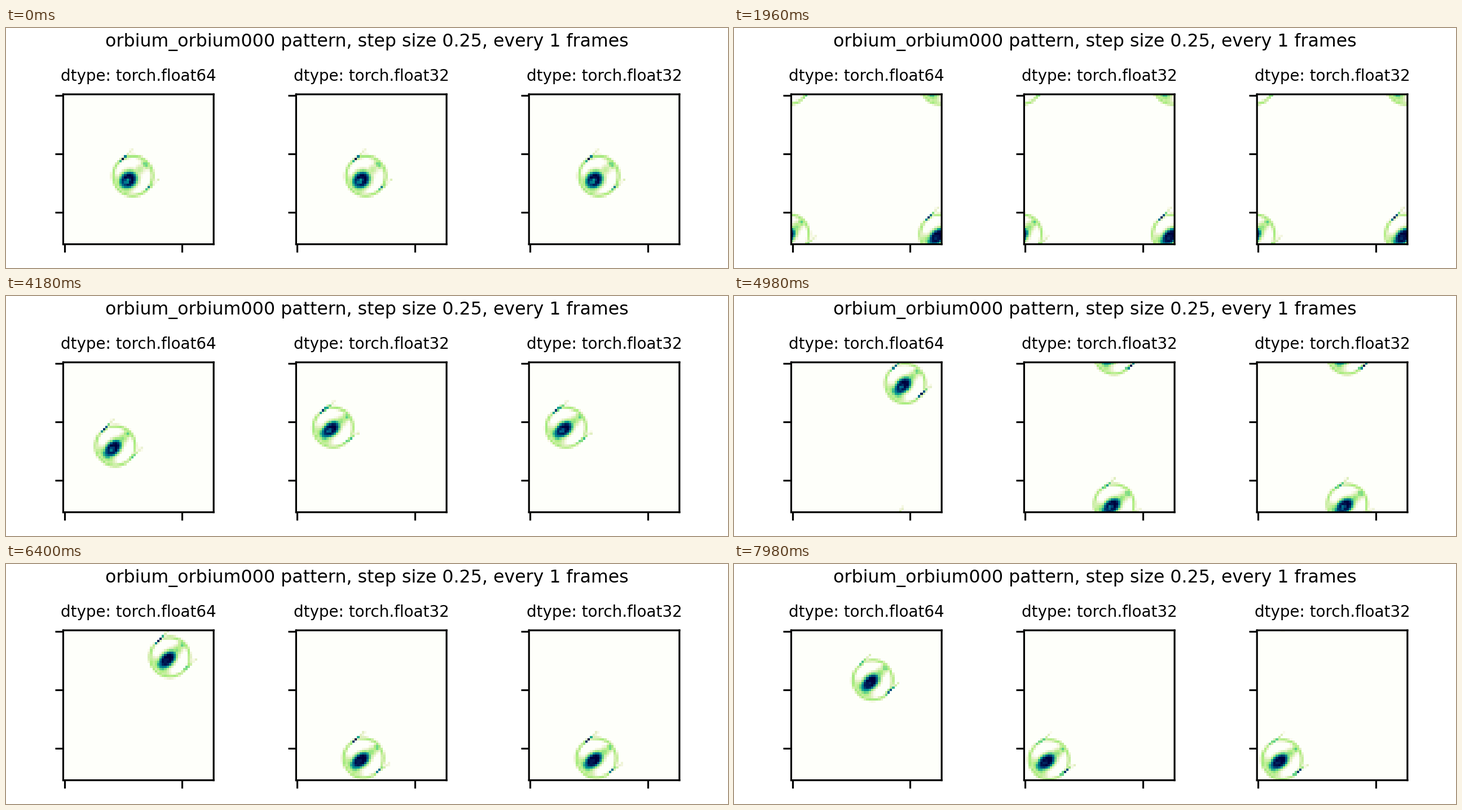
Recreate the animation shown at these times as a matplotlib script. Size 1280 by 427 pixels, loop 8000 ms.

```python
import numpy as np
import matplotlib.pyplot as plt
from matplotlib.animation import FuncAnimation
from matplotlib.colors import LinearSegmentedColormap

W, H, DPI = 1280, 427, 256
PT = 1.114                       # point scale: the layout is 4.5 inches wide
N, FRAMES = 64, 400
SIDE, TOP = 266.7, 118.0
LEFTS = (101.45, 514.35, 927.2)
DTYPES = ("float64", "float32", "float32")

CMAP = LinearSegmentedColormap.from_list("deep", [
    (0.00, "#fefffa"), (0.04, "#f9faea"), (0.10, "#e6f0c8"),
    (0.25, "#b0ee82"), (0.42, "#54cd8a"), (0.55, "#009691"),
    (0.70, "#00648c"), (0.85, "#002d66"), (1.00, "#00003c")])

# Unwrapped path of the glider in cells; single precision veers off midway.
PATH_T = (0, 54, 142, 399)
TURN_T = (0, 54, 130, 155)
PATHS = {
    "float64": ((29.7, -23.1, -106.4, -349.2), (34.8, 82.3, 165.0, 405.2),
                (42, 44.5, 44.7, 44.7)),
    "float32": ((29.7, -23.1, -106.6, -373.3), (34.8, 82.3, 165.0, 375.1),
                (42, 44.5, 44.0, 38.2)),
}

grid_y, grid_x = np.mgrid[0:N, 0:N] + 0.5


def bump(u, center, width):
    return np.exp(-((u - center) / width) ** 2)


def wrap(d):
    return (d + N / 2) % N - N / 2


def body(a, b, n):
    """Density at a (forward) and b (sideways) from the ring's centre."""
    r, side = np.hypot(a, b), np.abs(b)
    start = np.exp(-n / 4)

    ring = 0.27 * bump(r, 8.4, 0.7) * (1 - 0.9 * (1 - start) * bump(a, -1.5, 2.4))

    mid = 1.3 + 1.0 * start
    length = np.where(a > mid, 4.8, 4.3) - 0.5 * start
    rho = np.hypot((a - mid) / length, b / (2.75 + 0.6 * start))
    core = np.minimum(1.15 * np.exp(-rho ** 3), 1.02)
    dip = 0.28 + 0.14 * np.sin(1.9 * n) + 0.3 * start
    core -= dip * bump(a, mid + 1, 1.4) * bump(b, 0, 0.95)

    front = 0.62 * bump(a, 5.2, 2.0) * bump(b, 0, 3.0)
    cheeks = 0.31 * bump(a, 6.2, 2.0) * bump(b, 0, 5.2) * (r < 9)
    tail = 0.33 * (1 - 0.4 * start) * bump(a, -3.8, 3.0) * bump(b, 0, 1.8)
    spot = 0.42 * bump(a, -7.3, 1.4) * bump(b, 0, 1.5 + 0.6 * start)

    flicker = 0.85 + 0.2 * np.sin(2.1 * n + 1.3 * np.sign(b) + 1)
    streak = flicker * bump(a, -1.9, 2.7 - 0.8 * start) * bump(side, 8.25, 0.42)
    tip = 0.13 * bump(a, -6.6, 1.1) * bump(side, 8.5, 0.6)

    v = np.max([ring, core, front, cheeks, tail, spot, streak, tip], axis=0)
    return np.where(v < 0.03, 0, v)


def field(dtype, n):
    xs, ys, turns = PATHS[dtype]
    dx = wrap(grid_x - np.interp(n, PATH_T, xs))
    dy = wrap(grid_y - np.interp(n, PATH_T, ys))
    h = np.radians(np.interp(n, TURN_T, turns))
    c, s = np.cos(h), np.sin(h)
    return body(-c * dx + s * dy, -s * dx - c * dy, n)


plt.rcParams["font.family"] = "DejaVu Sans"
fig = plt.figure(figsize=(W / DPI, H / DPI), dpi=DPI, facecolor="white")
fig.suptitle("orbium_orbium000 pattern, step size 0.25, every 1 frames",
             fontsize=8 * PT)

images = []
for left, dtype in zip(LEFTS, DTYPES):
    ax = fig.add_axes([left / W, 1 - (TOP + SIDE) / H, SIDE / W, SIDE / H])
    images.append(ax.imshow(field(dtype, 0), cmap=CMAP, vmin=0, vmax=1,
                            interpolation="nearest", aspect="auto"))
    ax.set_title(f"dtype: torch.{dtype}", fontsize=7 * PT, pad=6 * PT)
    ax.set_xticks([0, 50])
    ax.set_yticks([0, 25, 50])
    ax.tick_params(length=3.5 * PT, width=0.8 * PT,
                   labelbottom=False, labelleft=False)
    for spine in ax.spines.values():
        spine.set_linewidth(0.8 * PT)
        spine.set_snap(False)


def update(n):
    for image, dtype in zip(images, DTYPES):
        image.set_data(field(dtype, n))
    return images


anim = FuncAnimation(fig, update, frames=FRAMES, interval=20,
                     repeat=True, repeat_delay=0, blit=False)
plt.show()
```
